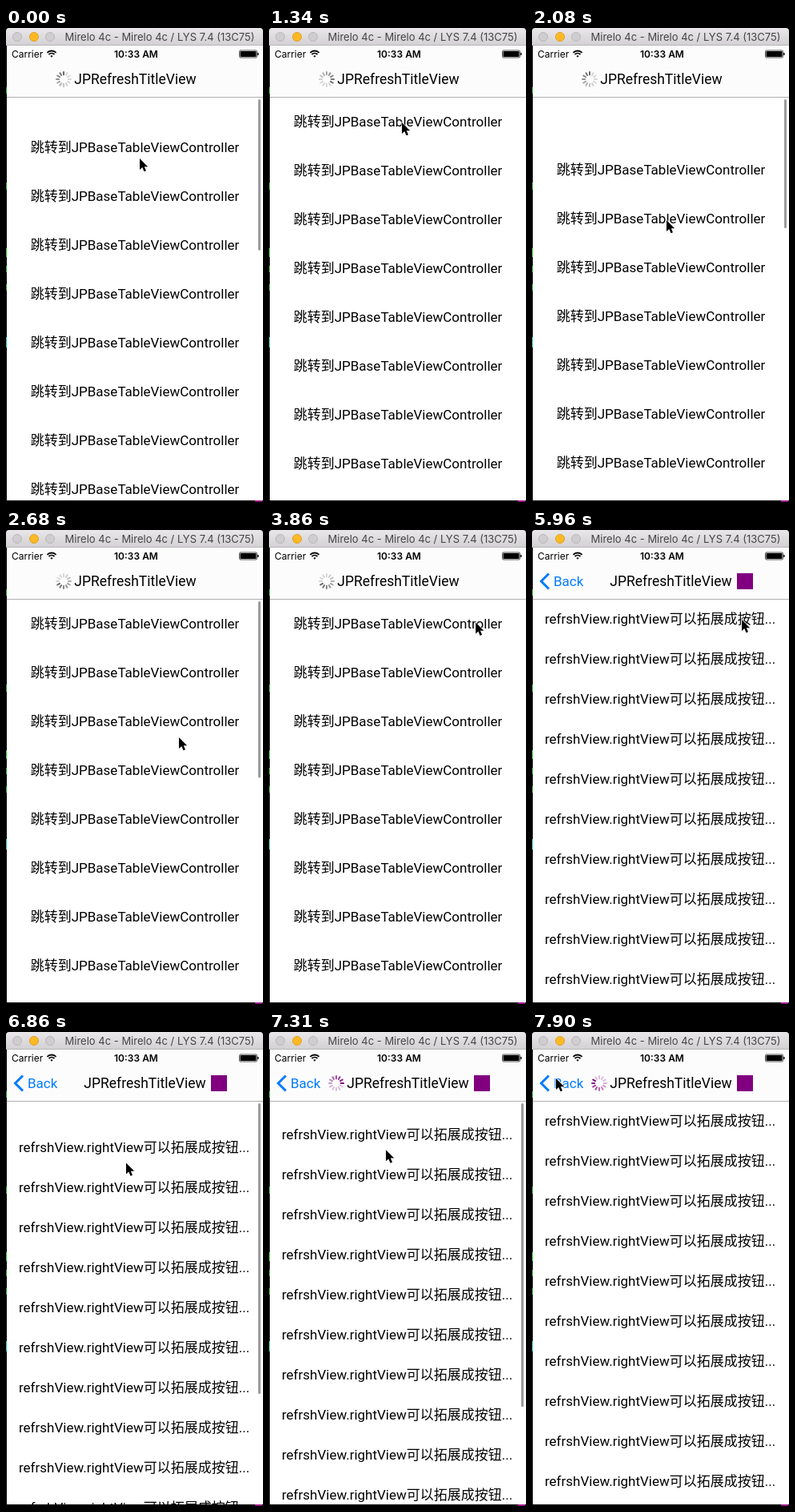
An HTML page for the animation above (8 s loop, 321 by 592 pixels).

```html
<!DOCTYPE html>
<html lang="zh-CN">
<head>
<meta charset="utf-8">
<title>Refresh title view</title>
<style>
  html, body { margin: 0; width: 100%; height: 100%; overflow: hidden; background: #fff; }
  svg { display: block; width: 321px; height: 592px; }
  text { font: 17px Roboto, "Noto Sans CJK SC", "Noto Sans CJK", sans-serif; fill: #000; white-space: pre; }
  .mid { text-anchor: middle; }
  .title { font-size: 17.5px; }
  .small { font: 12px Inter, sans-serif; }
  .clock { font-weight: 600; }
  .window { font: 13px Inter, sans-serif; fill: #444; }
  .bar { fill: #9b9b9b; }
</style>
</head>
<body>
<svg viewBox="0 0 321 592">
  <defs>
    <linearGradient id="chrome" x2="0" y2="1">
      <stop stop-color="#e9e7e9"/><stop offset="1" stop-color="#d2d0d2"/>
    </linearGradient>
    <clipPath id="screen"><rect x="1" y="87" width="320" height="503"/></clipPath>
    <clipPath id="nav"><rect x="1" y="22" width="320" height="64"/></clipPath>
  </defs>
  <rect width="321" height="592"/>
  <g id="behind"></g>
  <rect x="1" y="22" width="320" height="568" fill="#fff"/>

  <g clip-path="url(#screen)">
    <g id="page0"><g id="list0"></g><rect id="bar0" class="bar" x="315" y="89" width="3" rx="1.5"/></g>
    <g id="page1">
      <rect x="1" y="87" width="320" height="503" fill="#fff"/>
      <g id="list1"></g><rect id="bar1" class="bar" x="315" y="89" width="3" rx="1.5"/>
    </g>
  </g>

  <rect x="1" y="22" width="320" height="64" fill="#fcfcfc"/>
  <rect x="1" y="86" width="320" height="1" fill="#b0b0b0"/>
  <g clip-path="url(#nav)">
    <g id="head0">
      <text class="mid title" x="161.5" y="70">JPRefreshTitleView</text>
      <g id="spin0" transform="translate(72 64)"></g>
    </g>
    <g id="head1">
      <text class="mid title" x="173.5" y="70">JPRefreshTitleView</text>
      <g id="spin1" transform="translate(84 64)"></g>
      <rect x="256" y="54" width="20" height="20" fill="#800080"/>
    </g>
    <g id="back">
      <path d="M21 54.5 11.5 64 21 73.5" fill="none" stroke="#007aff" stroke-width="3"/>
      <text x="27" y="70" style="fill:#007aff">Back</text>
    </g>
  </g>

  <text class="small" x="7" y="36.5">Carrier</text>
  <g fill="none" stroke="#000" stroke-width="1.8">
    <path d="M51.4 30.8A8 8 0 0 1 62.6 30.8M53.5 33A5 5 0 0 1 60.5 33"/>
    <path d="M55.4 35A2.2 2.2 0 0 1 58.6 35L57 36.7Z" fill="#000" stroke="none"/>
  </g>
  <text class="small clock mid" x="162.5" y="36.5">10:33 AM</text>
  <rect x="291.5" y="28" width="22" height="9" rx="1.5" fill="#fff" stroke="#000" stroke-width=".7"/>
  <rect x="292.5" y="29" width="20" height="7" rx=".8"/>
  <rect x="314.2" y="31" width="1.5" height="3" rx=".7"/>

  <path d="M0 22V4Q0 0 4 0H317Q321 0 321 4V22Z" fill="url(#chrome)"/>
  <rect y="21" width="321" height="1" fill="#b9b7b9"/>
  <g stroke-width="1">
    <circle cx="14" cy="11" r="5.5" fill="#cfcdcf" stroke="#b9b7b9"/>
    <circle cx="35" cy="11" r="5.5" fill="#fdb924" stroke="#e0a028"/>
    <circle cx="55" cy="11" r="5.5" fill="#cfcdcf" stroke="#b9b7b9"/>
  </g>
  <text class="window mid" x="192" y="16">Mirelo 4c - Mirelo 4c / LYS 7.4 (13C75)</text>

  <path id="cursor" d="M0 0V14L3.3 11.1 5.5 16.3 8 15.2 5.8 10.2H10.2Z" stroke="#fff" stroke-width="1.2" paint-order="stroke"/>
</svg>
<script>
const $ = id => document.getElementById(id);
const clamp = v => Math.min(1, Math.max(0, v));

function add(parent, tag, attrs, text) {
  const el = document.createElementNS('http://www.w3.org/2000/svg', tag);
  for (const k in attrs) el.setAttribute(k, attrs[k]);
  if (text) el.textContent = text;
  parent.append(el);
  return el;
}

const LOOP = 8000, TICK = 149, PUSH = 5600, PUSH_TIME = 350, PEAK = 60;

// Pull-to-refresh gestures: page, grab and release time, grab height
const pulls = [
  { page: 0, grab: -900, drop: -130, y: 0 },
  { page: 0, grab: 1400, drop: 2090, y: 118 },
  { page: 1, grab: 6600, drop: 7085, y: 100 }
];

// Pointer stops: time, x, y
const stops = [
  [0, 167, 163], [290, 167, 163], [1150, 166, 118], [1400, 166, 118], [2090, 168, 240],
  [2680, 216, 259], [3360, 250, 115], [4010, 264, 116], [4180, 264, 116], [4310, 253, 104],
  [4760, 288, 63], [4960, 288, 63], [5200, 262, 112], [5970, 262, 112], [6480, 150, 100],
  [6600, 150, 100], [7085, 150, 222], [7305, 146, 147], [7890, 30, 58], [LOOP, 30, 58]
];

const pages = [
  { text: '跳转到JPBaseTableViewController', x: 161, cls: 'mid', y: 123, step: 61, rows: 8, bar: 221, ink: '#666' },
  { text: 'refrshView.rightView可以拓展成按钮...', x: 16, cls: '', y: 117, step: 50, rows: 10, bar: 396, ink: '#800080' }
];

pages.forEach((p, n) => {
  for (let i = 0; i < p.rows; i++)
    add($('list' + n), 'text', { x: p.x, y: p.y + i * p.step, class: p.cls }, p.text);
  for (let i = 0; i < 12; i++)
    add($('spin' + n), 'rect', { x: -1, y: -10, width: 2, height: 5.2, rx: 1, fill: p.ink, transform: `rotate(${i * 30})` });
});

// Slivers of the window behind
for (const [y, h, c] of [[74, 8, '#1a9e1a'], [193, 9, '#1a9e1a'], [275, 11, '#1fc71f'],
  [297, 8, '#1a9e1a'], [320, 8, '#1a9e1a'], [386, 13, '#12c9a0']])
  add($('behind'), 'rect', { x: 0, y, width: 1, height: h, fill: c });
add($('behind'), 'rect', { x: 311, y: 590, width: 9, height: 2, fill: '#a0168c' });

function pointer(t) {
  const i = Math.max(1, stops.findIndex(s => s[0] >= t));
  const [t0, x0, y0] = stops[i - 1], [t1, x1, y1] = stops[i];
  const u = (t - t0) / (t1 - t0), k = u * u * (3 - 2 * u);
  return [x0 + (x1 - x0) * k, y0 + (y1 - y0) * k];
}

const rubber = d => 568 * (1 - 1 / (Math.max(0, d) * .55 / 568 + 1));

// List offset and scroll bar opacity
function scroll(page, t, y) {
  const p = pulls.filter(q => q.page === page && q.grab <= t).pop();
  if (!p) return [0, 0];
  if (t < p.drop) return [rubber(y - p.y), clamp((t - p.grab) / 80)];
  const age = t - p.drop, w = age * .012;
  return [PEAK * (1 + w) * Math.exp(-w), clamp((780 - age) / 180)];
}

function spin(n, t, on) {
  const g = $('spin' + n), lead = Math.floor(t * 12 / 1000);
  g.style.display = on ? '' : 'none';
  [...g.children].forEach((spoke, i) => {
    const behind = (((lead - i) % 12) + 12) % 12;
    spoke.setAttribute('opacity', Math.max(.25, 1 - behind * .1));
  });
}

const slide = (id, x) => $(id).setAttribute('transform', `translate(${x} 0)`);
const fade = (id, o) => $(id).setAttribute('opacity', o);

function draw(t) {
  const [x, y] = pointer(t);
  $('cursor').setAttribute('transform', `translate(${x} ${y})`);

  pages.forEach((p, n) => {
    const [off, alpha] = scroll(n, t, y);
    $('list' + n).setAttribute('transform', `translate(0 ${off})`);
    $('bar' + n).setAttribute('height', p.bar - off);
    fade('bar' + n, alpha);
  });
  spin(0, t, t < 3900);
  spin(1, t, t >= 7085);

  const p = 1 - (1 - clamp((t - PUSH) / PUSH_TIME)) ** 3;
  slide('page0', -96 * p);
  slide('page1', 321 * (1 - p));
  slide('head0', -90 * p);
  slide('head1', 120 * (1 - p));
  fade('head0', 1 - p);
  fade('head1', p);
  fade('back', p);
}

function frame(now) {
  const n = Math.floor((now % LOOP + 9) / TICK);
  draw(Math.max(0, n * TICK - 5));
  requestAnimationFrame(frame);
}
frame(performance.now());
</script>
</body>
</html>
```
